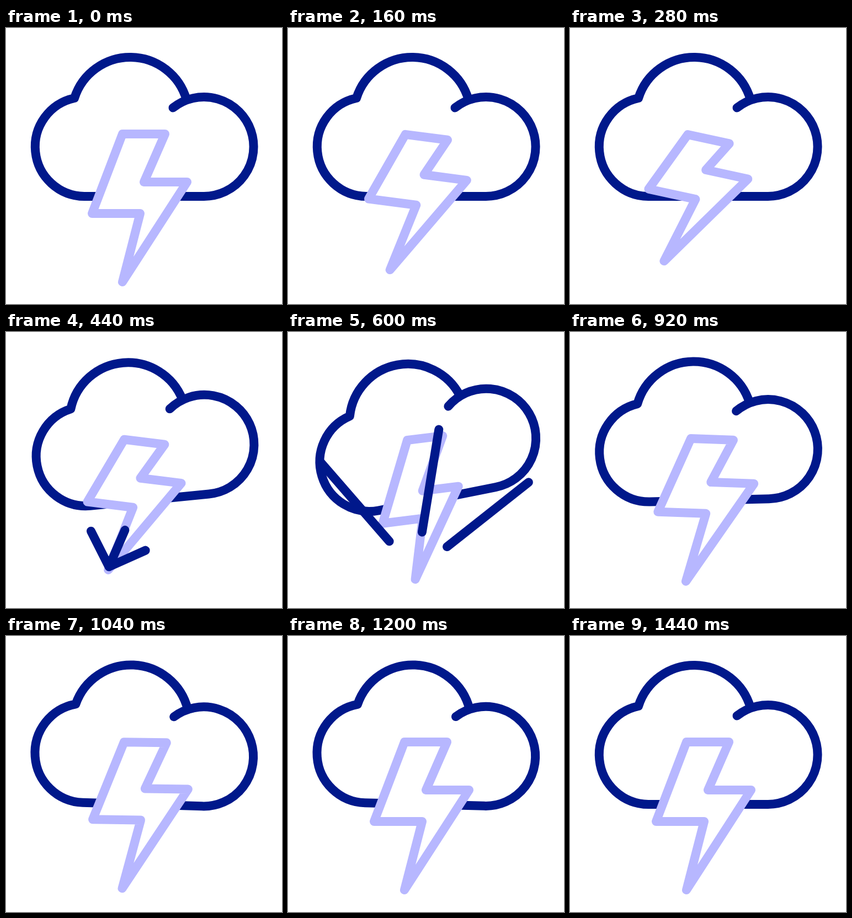
Recreate the animation shown at these times as an HTML page. Size 500x500 px, loop 2 s.

```html
<!DOCTYPE html>
<html lang="en">
<head>
<meta charset="utf-8">
<title>Thunderstorm</title>
<style>
  html, body { margin: 0; width: 100%; height: 100%; overflow: hidden; background: #fff; }
  svg { display: block; width: 100vw; height: 100vh; }
  path { fill: none; stroke: #00188b; stroke-width: 16; stroke-linecap: round; stroke-linejoin: round; }
  #bolt { fill: #fff; stroke: #b7b7ff; }
</style>
</head>
<body>
<svg viewBox="0 0 500 500">
  <path id="cloud" d="M302.5 144.6A90 90 0 1 1 358 305H142A90 90 0 0 1 124 127A106 106 0 0 1 327 130"/>
  <g id="strike">
    <path id="bolt"/>
    <path id="sparks"/>
  </g>
</svg>
<script>
const LOOP = 2000, STEP = 40;
const $ = id => document.getElementById(id);
const cloud = $('cloud'), strike = $('strike'), bolt = $('bolt'), sparks = $('sparks');

const smooth = p => p * p * (3 - 2 * p);
const rush = p => p ** 1.9;
const clamp = p => Math.min(1, Math.max(0, p));
const span = (t, a, b) => smooth(clamp((t - a) / (b - a)));

// Bolt outline: the first two corners are the top edge
const corners = [[211, 192], [288, 192], [250, 279], [328, 279], [211, 460], [243, 336], [156, 336]];

// w and h squash the bolt; its top edge and the rest shift separately
const rest = { turn: 0, w: 1, h: 1, topX: 0, topY: 0, lowX: 0, lowY: 0 };
const boltKeys = [
  { at: 0, ...rest },
  { at: 280, ...rest, turn: 12.2, h: 0.98, topX: -9, topY: 6, lowX: -2.5, lowY: -23.7 },
  { at: 600, turn: -7.1, w: 0.84, h: 0.87, topX: 5.7, topY: -17.7, lowX: -11, lowY: 1, ease: rush },
  { at: 920, ...rest, turn: 2, topX: 6, topY: 2, lowX: 6, lowY: -7.3 },
  { at: 1120, ...rest }
];
const cloudKeys = [
  { at: 280, turn: 0 }, { at: 600, turn: -11.3 }, { at: 1080, turn: 2 }, { at: 1440, turn: 0 }
];

function pose(keys, t) {
  const next = keys.findIndex(k => k.at > t);
  if (next < 0) return keys[keys.length - 1];
  if (next === 0) return keys[0];
  const a = keys[next - 1], b = keys[next];
  const p = (b.ease || smooth)((t - a.at) / (b.at - a.at));
  const mix = {};
  for (const name in a) mix[name] = a[name] + (b[name] - a[name]) * p;
  return mix;
}

function boltPath(k) {
  const points = corners.map(([x, y], i) => {
    const top = i < 2;
    return [
      250 + (x - 250) * k.w + (top ? k.topX : k.lowX),
      336 + (y - 336) * k.h + (top ? k.topY : k.lowY)
    ];
  });
  return `M${points.join(' ')}Z`;
}

// Three rays fly out of the tip; their tails follow the same course later
function sparkPath(t) {
  const reach = time => 262 * span(time, 350, 610);
  const near = reach(t - 160), far = reach(t);
  if (far - near < 0.5) return '';
  return [-123.9, -73.6, -31.2].map(deg => {
    const a = deg * Math.PI / 180;
    const at = r => `${208.5 + r * Math.cos(a)} ${431 + r * Math.sin(a)}`;
    return `M${at(near)}L${at(far)}`;
  }).join('');
}

function draw(t) {
  const k = pose(boltKeys, t);
  cloud.setAttribute('transform', `rotate(${pose(cloudKeys, t).turn} 246 201)`);
  strike.setAttribute('transform', `rotate(${k.turn} 244 250)`);
  bolt.setAttribute('d', boltPath(k));
  sparks.setAttribute('d', sparkPath(t));
}

const began = performance.now();
function tick() {
  const t = (performance.now() - began) % LOOP;
  draw(Math.floor(t / STEP) * STEP);
  requestAnimationFrame(tick);
}
tick();
</script>
</body>
</html>
```
